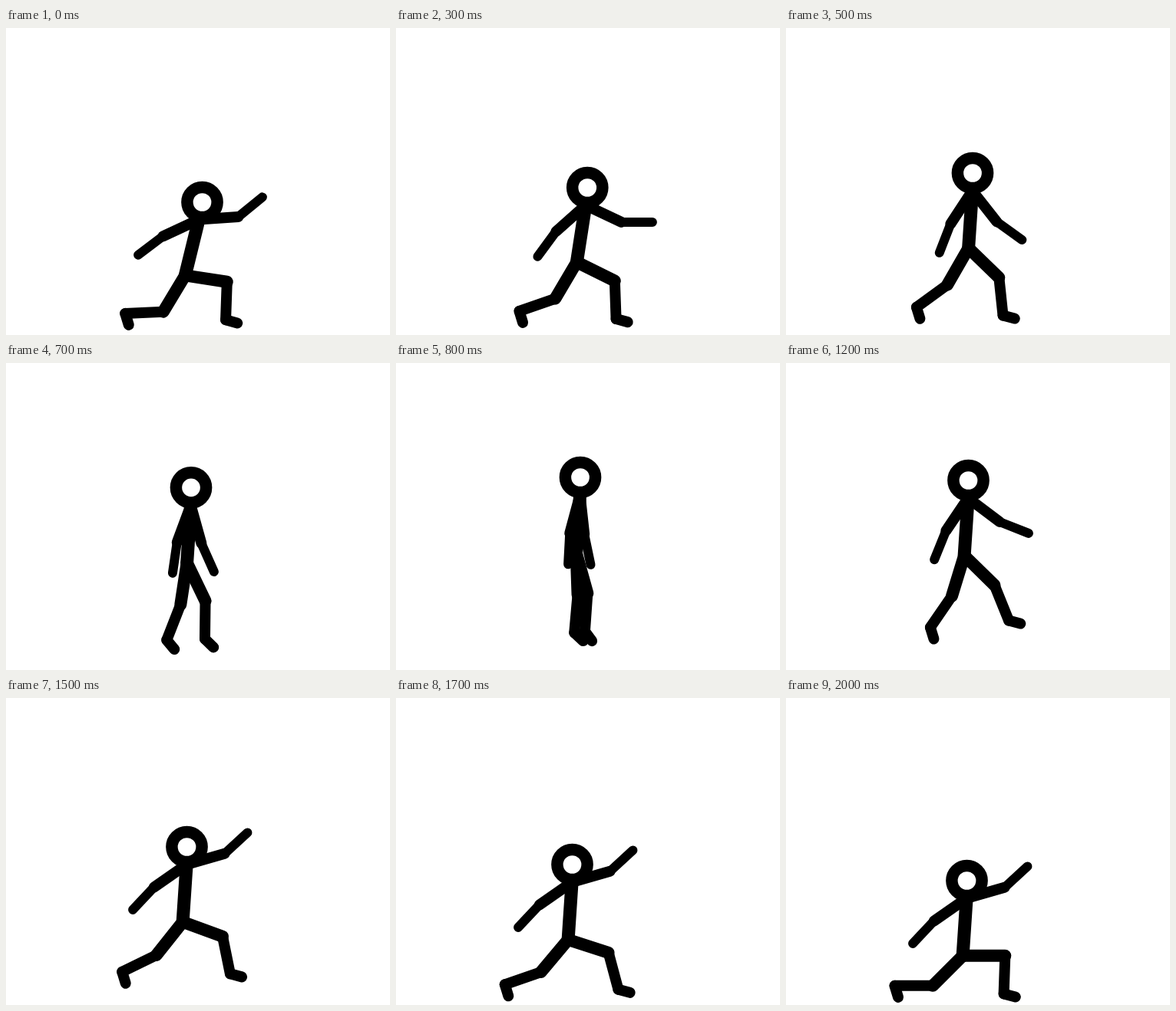
These frames come from a looping animation (500 px wide and 400 px high, 2100 ms). An HTML page with a canvas:

```html
<!DOCTYPE html>
<html lang="en">
<head>
<meta charset="utf-8">
<title>Jumping lunge</title>
<style>
  html, body { margin: 0; width: 100%; height: 100%; overflow: hidden; background: #fff; }
  canvas { display: block; }
</style>
</head>
<body>
<canvas width="500" height="400"></canvas>
<script>
const ctx = document.querySelector('canvas').getContext('2d');
const LOOP = 2100, STEP = 100;
const START = 100;  // the first lunge is held until here
const CROSS = 900;  // arms pass each other in the air
const HOP = 24;

// Bones as [length, width], from the body outwards
const NECK_LENGTH = 23;
const TORSO = [[75, 17]];
const ARM = [[51.5, 14], [40.5, 12]];
const LEG = [[55.2, 16], [49.6, 14], [15.7, 14]];

// Key poses: head centre, then thigh and shin angles, in degrees clockwise from the right
const pose = (time, head, front, back) => ({ time, head, front, back });
const lunge = pose(START, [255.5, 227], [8.7, 92], [121, 177.5]);
const stride = pose(500, [243, 189], [44, 84], [120, 144]);
const closed = pose(800, [240, 149], [74.5, 94], [88, 95]);
const open = pose(1200, [237.5, 153], [44.5, 68], [107, 124.5]);
const leap = pose(1500, [235.5, 194], [20, 78.5], [128.5, 154]);
const reach = pose(1700, [229.5, 217], [18, 75], [130, 161]);
const landing = pose(2000, [235.5, 238], [0, 92], [135, 180]);
const poses = [lunge, stride, closed, open, leap, reach, landing];

const clamp = v => Math.min(1, Math.max(0, v));
const mix = (a, b, k) => a.map((v, i) => v + (b[i] - v) * k);

function bodyAt(time) {
  const next = poses.findIndex(p => p.time > time);
  const i = next < 0 ? poses.length - 2 : next - 1;
  const a = poses[i], b = poses[i + 1];
  const k = (time - a.time) / (b.time - a.time);
  const airborne = a === closed;
  const head = mix(a.head, b.head, k);
  if (airborne) head[1] -= HOP * Math.sin(Math.PI * k);

  // The legs change places in the air
  const [front, back] = airborne
    ? [mix(a.back, b.front, k), mix(a.front, b.back, k)].sort((p, q) => p[0] - q[0])
    : [mix(a.front, b.front, k), mix(a.back, b.back, k)];
  return { head, front, back };
}

// Arms close on the way up and open, lower at the back, on the way down
function armsAt(time) {
  const rising = time < CROSS;
  const open = rising
    ? ((CROSS - time) / (CROSS - START)) ** 1.3 * 94
    : Math.min(1, (time - CROSS) / 600) * 106;
  const swing = open - 8;
  const front = 82 - swing;
  const back = 106 + swing * (rising ? 0.57 : 0.4);
  const bend = 6 + swing * (rising ? 0.34 : 0.21);
  return { swing, front: [front, front - bend], back: [back, back - 12] };
}

function along([x, y], length, degrees) {
  const angle = degrees * Math.PI / 180;
  return [x + length * Math.cos(angle), y + length * Math.sin(angle)];
}

function drawLimb(start, bones, angles) {
  return bones.reduce((from, [length, width], i) => {
    const to = along(from, length, angles[i]);
    ctx.lineWidth = width;
    ctx.beginPath();
    ctx.moveTo(...from);
    ctx.lineTo(...to);
    ctx.stroke();
    return to;
  }, start);
}

function draw(time) {
  const { head, front, back } = bodyAt(time);
  const arms = armsAt(time);
  const lean = 10 * clamp((stride.time - time) / (stride.time - START));
  const spread = clamp(arms.swing / 30);

  ctx.fillStyle = '#fff';
  ctx.fillRect(0, 0, 500, 400);
  ctx.strokeStyle = '#000';
  ctx.lineCap = 'round';

  const neck = along(head, NECK_LENGTH, 91 + lean);
  const hip = drawLimb(neck, TORSO, [93.8 + lean]);
  drawLimb(neck, ARM, arms.front);
  drawLimb(neck, ARM, arms.back);
  drawLimb(hip, LEG, [...front, 54 - 39 * spread]);
  drawLimb(hip, LEG, [...back, 43 + 30 * spread]);

  ctx.lineWidth = 15.5;
  ctx.beginPath();
  ctx.arc(...head, 19.6, 0, 2 * Math.PI);
  ctx.fill();
  ctx.stroke();
}

let start;
function tick(now) {
  start ??= now;
  const time = Math.floor((now - start) % LOOP / STEP) * STEP;
  draw(Math.max(time, START));
  requestAnimationFrame(tick);
}
requestAnimationFrame(tick);
</script>
</body>
</html>
```
